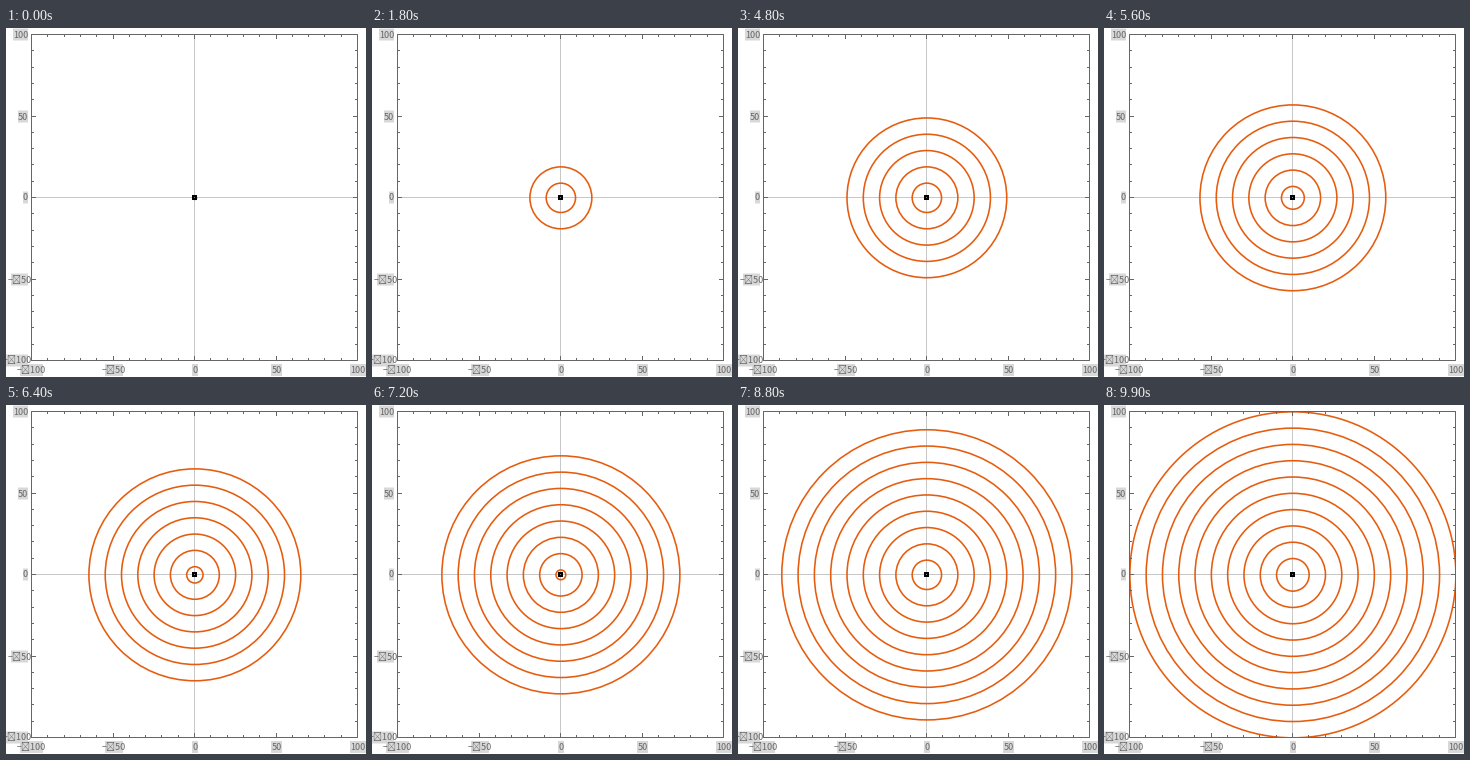
These frames come from a looping animation (360x349 px, 10 s). A matplotlib script:

```python
from math import floor

import matplotlib.pyplot as plt
from matplotlib.animation import FuncAnimation
from matplotlib.patches import Circle, Rectangle

W, H, DPI = 360, 349, 100
PX = 72 / DPI                       # points per pixel
LEFT, TOP, SIDE = 25.5, 6.5, 326
RIGHT, BOTTOM = LEFT + SIDE, TOP + SIDE
UNIT = SIDE / 200
CX, CY = 188.87, 169.83             # centre of the waves
FRAMES, GAP = 100, 10
ORANGE = (0.9, 0.36, 0.054)
DARK, PALE, SHADE = "#666666", "#c8c8c8", "#d8d8d8"

plt.rcParams["font.family"] = "Noto Sans CJK JP"
fig = plt.figure(figsize=(W / DPI, H / DPI), dpi=DPI, facecolor="white")
ax = fig.add_axes([0, 0, 1, 1])
ax.set_xlim(0, W)
ax.set_ylim(H, 0)
ax.axis("off")


def to_x(v):
    return floor(LEFT + (v + 100) * UNIT) + 0.5


def to_y(v):
    return floor(BOTTOM - (v + 100) * UNIT) + 0.5


def box(x, y, w, h, color, z):
    ax.add_patch(Rectangle((x, y), w, h, fc=color, lw=0, snap=False, zorder=z))


def line(x0, y0, x1, y1, color, z):
    ax.plot([x0, x1], [y0, y1], color=color, lw=PX, zorder=z,
            solid_capstyle="butt", snap=False)


def label(value, right, mid, width):
    text = str(value).replace("-", "\u2212\u2009")
    box(right - width, mid - 6, width, 12, SHADE, 0)
    ax.text(right - width / 2, mid + 3, text, size=9 * PX, color=DARK,
            ha="center", va="baseline", zorder=6)


line(to_x(0), TOP, to_x(0), BOTTOM, PALE, 1)
line(LEFT, to_y(0), RIGHT, to_y(0), PALE, 1)

for v in range(-100, 101, 10):
    size = 4.5 if v % 50 == 0 else 2.5
    x, y = to_x(v), to_y(v)
    line(x, TOP, x, TOP + size, DARK, 4)
    line(x, BOTTOM, x, BOTTOM - size, DARK, 4)
    line(LEFT, y, LEFT + size, y, DARK, 4)
    line(RIGHT, y, RIGHT - size, y, DARK, 4)
ax.add_patch(Rectangle((LEFT, TOP), SIDE, SIDE, fill=False, ec=DARK,
                       lw=PX, snap=False, zorder=4))

for v, w in ((-100, 22), (-50, 17), (0, 5), (50, 10), (100, 15)):
    label(v, 22, floor(to_y(v)) + 0.5, w)
    label(v, floor(to_x(v) + w / 2 + 1), 342, w + 1)

clip = Rectangle((LEFT, TOP), SIDE, SIDE, transform=ax.transData)
rings = []
for _ in range(FRAMES // GAP):
    ring = Circle((CX, CY), 1, fill=False, ec=ORANGE, lw=1.6 * PX, zorder=3)
    ax.add_patch(ring)
    ring.set_clip_path(clip)
    rings.append(ring)

# source of the waves: a small block with a lighter core
box(186, 167, 5, 5, "black", 5)
box(188, 169, 1, 1, "#808080", 5.1)


def update(i):
    for k, ring in enumerate(rings):
        radius = i + 1 - GAP * k
        ring.set_visible(radius > 0)
        ring.set_radius(max(radius, 0) * UNIT)
    return rings


anim = FuncAnimation(fig, update, frames=FRAMES, interval=100,
                     init_func=lambda: update(0), repeat=True,
                     repeat_delay=0, blit=False)
plt.show()
```
